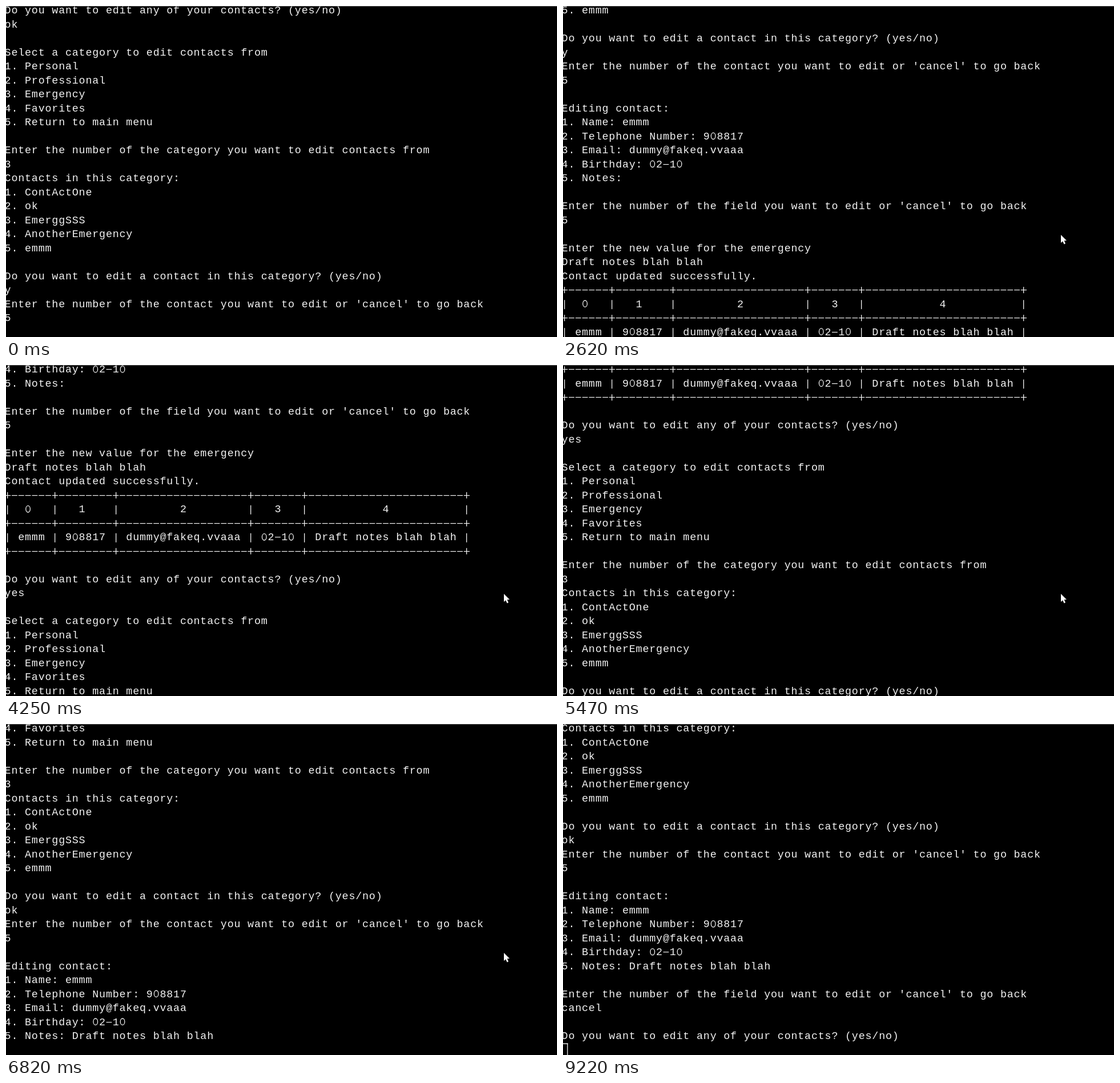
Recreate the animation shown at these times as an HTML page with a canvas. Size 965 by 580 pixels, loop 9.29 s.

```html
<!DOCTYPE html>
<html lang="en">
<head>
<meta charset="utf-8">
<title>Contact editor session</title>
<style>
  html, body { margin: 0; width: 100%; height: 100%; overflow: hidden; background: #000; }
  canvas { display: block; }
</style>
</head>
<body>
<canvas id="stage" width="965" height="580"></canvas>
<script>
const ctx = document.getElementById('stage').getContext('2d');
const WIDTH = 965, HEIGHT = 580, LOOP = 9290;
const CELL_W = 11.82, CELL_H = 24.49, LEFT = -2.8, BASELINE = 13.4, ROWS = 24;
const INK = '#f2f2f2';

// Session transcript
const EMAIL = 'dummy@fakeq.vvaaa', PHONE = '908817', NOTE = 'Draft notes blah blah';
const ASK_ANY = 'Do you want to edit any of your contacts? (yes/no)';
const numbered = items => items.map((item, i) => `${i + 1}. ${item}`);

const categories = answer => [
  '', 'Select a category to edit contacts from',
  ...numbered(['Personal', 'Professional', 'Emergency', 'Favorites', 'Return to main menu']),
  '', 'Enter the number of the category you want to edit contacts from', '3',
  'Contacts in this category:',
  ...numbered(['ContActOne', 'ok', 'EmerggSSS', 'AnotherEmergency', 'emmm']),
  '', 'Do you want to edit a contact in this category? (yes/no)', answer,
  "Enter the number of the contact you want to edit or 'cancel' to go back", '5'
];

const editor = (notes, answer) => [
  '', 'Editing contact:',
  ...numbered(['Name: emmm', 'Telephone Number: ' + PHONE, 'Email: ' + EMAIL,
    'Birthday: 02-10', 'Notes: ' + notes]),
  '', "Enter the number of the field you want to edit or 'cancel' to go back", answer, ''
];

function table(values) {
  const rule = '+' + values.map(v => '-'.repeat(v.length + 2) + '+').join('');
  const center = (text, size) =>
    (' '.repeat(Math.floor((size - text.length) / 2)) + text).padEnd(size);
  const row = cells => '|' + cells.map((c, i) => center(c, values[i].length + 2) + '|').join('');
  const header = values.map((v, i) => String(i));
  return [rule, row(header), rule, row(values), rule];
}

const lines = [
  ASK_ANY, 'ok', ...categories('y'), ...editor('', '5'),
  'Enter the new value for the emergency', NOTE, 'Contact updated successfully.',
  ...table(['emmm', PHONE, EMAIL, '02-10', NOTE]),
  '', ASK_ANY, 'yes', ...categories('ok'), ...editor(NOTE, 'cancel'), ASK_ANY
];

// Each jump scrolls five and a half lines, snapped to whole rows
const SCROLL_TIMES = [1310, 1910, 2620, 3300, 4250, 4840, 5470, 6310, 6820, 7440];
const topLine = t => Math.round(5.5 * SCROLL_TIMES.filter(at => t >= at).length);

function drawChar(ch, x, y) {
  const mid = x + CELL_W / 2;
  if (ch === '-') {
    ctx.fillRect(x + 1, Math.round(y - 6), CELL_W - 2, 1.2);
  } else if (ch === '+') {
    ctx.fillRect(x + 0.8, Math.round(y - 6), CELL_W - 1.6, 1.2);
    ctx.fillRect(Math.round(mid - 0.7), y - 11, 1.3, 11);
  } else if (ch === '|') {
    ctx.fillRect(Math.round(mid - 0.7), y - 12.5, 1.3, 16);
  } else if (ch === '0') {
    // Plain zero, without the dot of the typeface
    ctx.beginPath();
    ctx.ellipse(mid, y - 6, 3.8, 5.7, 0, 0, Math.PI * 2);
    ctx.stroke();
  } else if (ch !== ' ') {
    ctx.fillText(ch, mid, y);
  }
}

function drawText(top) {
  ctx.font = '18.4px "Liberation Mono", monospace';
  ctx.textAlign = 'center';
  ctx.fillStyle = ctx.strokeStyle = INK;
  ctx.lineWidth = 1.3;
  lines.slice(top, top + ROWS).forEach((line, row) => {
    const y = BASELINE + row * CELL_H;
    [...line].forEach((ch, col) => drawChar(ch, LEFT + col * CELL_W, y));
  });
}

const REST = [872, 401];
const mix = (a, b, p) => a.map((v, i) => v + (b[i] - v) * p);

function pointerAt(t) {
  if (t < 160 || t >= 8970) return null;
  if (t < 610) {
    // Sweeps up, overshoots, then settles
    const p = Math.floor((t - 160) / 45) / 10;
    const turn = [862, 391];
    if (p < 0.7) return mix([914, 542], turn, Math.sin(p / 0.7 * Math.PI / 2));
    return mix(turn, REST, (p - 0.7) / 0.3);
  }
  if (t < 8500) return REST;
  const p = (Math.floor((t - 8500) / 27.65) + 1) / 18;
  return mix(REST, [918, 582], p ** 1.6);
}

function drawPointer([x, y]) {
  const shape = [[0, 0], [0, 14], [3.2, 11.2], [5.6, 16.4], [8, 15.3], [5.7, 10.2], [10, 10]];
  ctx.beginPath();
  shape.forEach(([dx, dy]) => ctx.lineTo(x + dx, y + dy));
  ctx.closePath();
  ctx.lineWidth = 2;
  ctx.strokeStyle = '#000';
  ctx.stroke();
  ctx.fillStyle = '#fff';
  ctx.fill();
}

function drawCaret() {
  ctx.fillStyle = INK;
  ctx.fillRect(0, 559.5, 8.5, 1.4);
  ctx.fillRect(7.2, 559.5, 1.3, 21);
}

function render(t) {
  ctx.fillStyle = '#000';
  ctx.fillRect(0, 0, WIDTH, HEIGHT);
  drawText(topLine(t));
  ctx.fillStyle = '#5c5c5c';
  ctx.fillRect(0, 0, WIDTH, 1);
  if (t >= 9220) drawCaret();
  const pointer = pointerAt(t);
  if (pointer) drawPointer(pointer);
}

const start = performance.now();
function tick() {
  render((performance.now() - start) % LOOP);
  requestAnimationFrame(tick);
}
tick();
</script>
</body>
</html>
```
